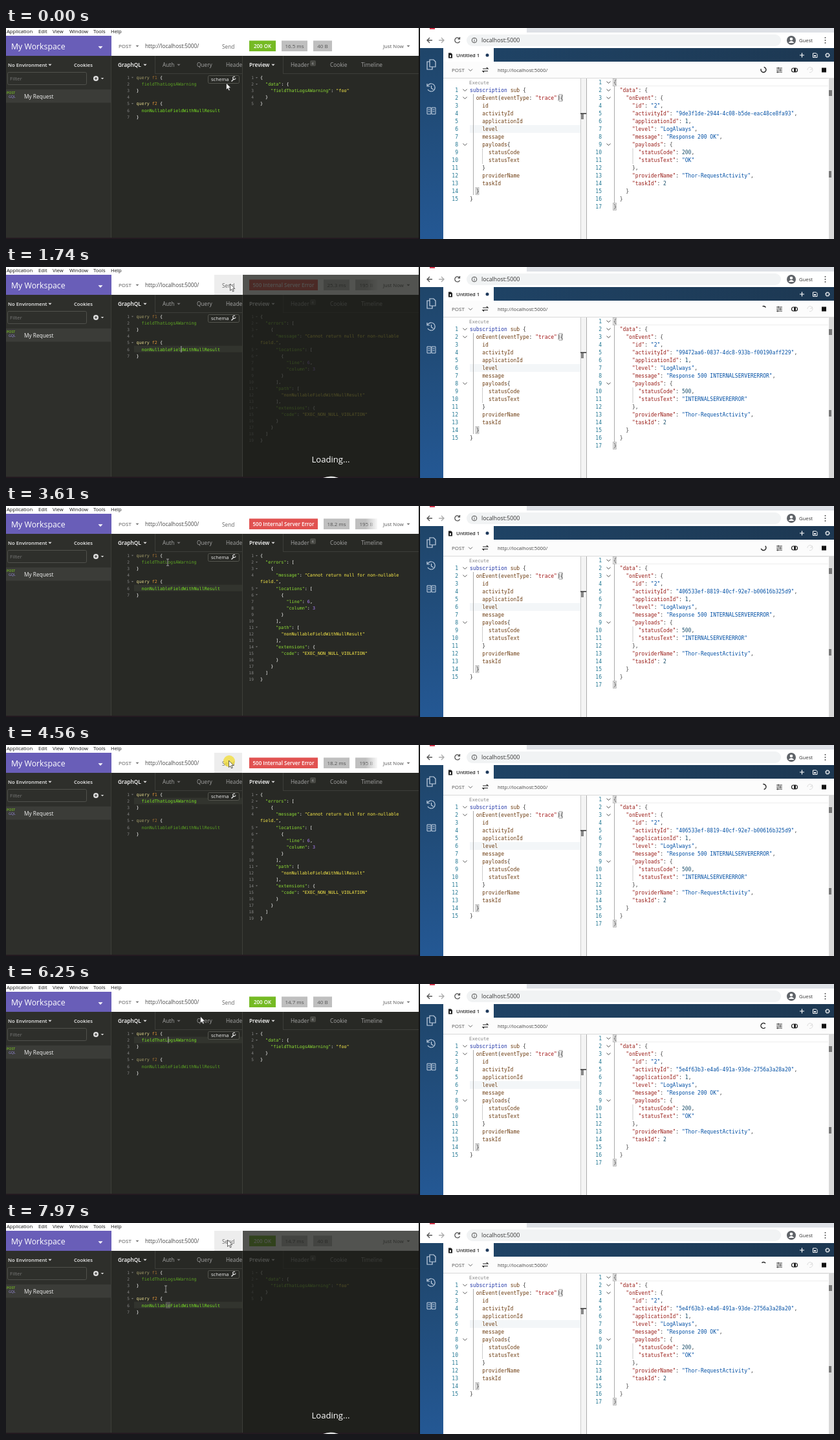
These frames come from a looping animation (1280x326 px, 8000 ms). An HTML page:

```html
<!DOCTYPE html>
<html>
<head>
<meta charset="utf-8">
<style>
html, body { margin: 0; width: 100%; height: 100%; overflow: hidden; background: #fff }
svg { display: block; width: 1280px; height: 326px }
text { white-space: pre; font-family: "Open Sans", "Noto Sans", sans-serif }
.m { font-family: "DejaVu Sans Mono", "Liberation Mono", monospace }
</style>
</head>
<body>
<svg viewBox="0 0 1280 326">
  <defs>
    <linearGradient id="bar"><stop stop-color="#1f4569"/><stop offset="1" stop-color="#1d3852"/></linearGradient>
    <linearGradient id="side" x2="0" y2="1"><stop stop-color="#1f4569"/><stop offset="1" stop-color="#245894"/></linearGradient>
    <linearGradient id="fade"><stop stop-color="#fff" stop-opacity="0"/><stop offset="1" stop-color="#fff"/></linearGradient>
  </defs>
  <g id="base"></g><g id="send"></g><g id="top"></g><g id="query"></g>
  <g id="preview"></g><g id="result"></g><g id="live"></g>
</svg>
<script>
const LOOP = 8000;
const $ = id => document.getElementById(id);
const rect = (x, y, w, h, fill, more = '') =>
  `<rect x="${x}" y="${y}" width="${w}" height="${h}" fill="${fill}" ${more}/>`;
const text = (x, y, s, size, fill, more = '') =>
  `<text x="${x}" y="${y}" font-size="${size}" fill="${fill}" ${more}>${s}</text>`;
const path = (d, stroke, w = 1, fill = 'none') =>
  `<path d="${d}" stroke="${stroke}" stroke-width="${w}" fill="${fill}"/>`;
const mono = (x, y, s, size, fill, more = '') => text(x, y, s, size, fill, 'class="m" ' + more);
const tri = (x, y, r, fill) => path(`M${x - r} ${y - r / 2}h${2 * r}l${-r} ${r * 1.1}z`, 'none', 0, fill);
const chevron = (x, y) => path(`M${x - 3} ${y - 1.5}l3 3 3-3`, '#555');
const bracket = (x, y) => rect(x, y, 5, 11, '#e4e4e4', 'stroke="#aaa" stroke-width=".7"');
const tint = (s, fill, more = '') => `<tspan fill="${fill}" ${more}>${s}</tspan>`;
const BOLD = 'font-weight="600"', END = 'text-anchor="end"';

// Colours JSON keys, strings and numbers
const json = (s, [key, str, num]) =>
  s.replace(/field\."|"[^"]*"?(?=(:?))|\b\d+\b|\bnull\b/g,
    (m, colon) => tint(m, colon ? key : /"/.test(m) ? str : num));

// ---------- static picture ----------
function drawBase() {
  let s = rect(0, 0, 640, 12, '#fff') + rect(0, 12, 163, 31, '#695eb8') + rect(163, 12, 475, 31, '#fff')
    + rect(0, 43, 163, 283, '#2e2f2b') + rect(163, 43, 476, 283, '#282925')
    + rect(0, 95, 162, 20.5, '#3b3c38')
    + path('M162.5 43V326M365.5 43V326M230.5 43V70M428.5 43V70M230 70.5H365M428 70.5H638', '#3d3e39')
    + rect(0, 324, 640, 2, '#231a20') + rect(638, 0, 2, 326, '#141414');
  s += rect(640, 0, 165, 7, '#fff') + rect(805, 0, 475, 7, '#dee1e6') + rect(655, 0, 8, 2, '#d33a50')
    + rect(640, 7, 640, 24, '#fff') + rect(712, 10, 486, 18, '#f1f3f4', 'rx="9"')
    + rect(640, 31, 640, 21, 'url(#bar)') + rect(640, 31, 36, 295, 'url(#side)')
    + rect(676, 31, 78, 21, '#fff') + rect(676, 52, 604, 274, '#fff')
    + rect(676, 52, 604, 25, '#fcfcfc') + path('M676 77.5H1280', '#d9d9d9')
    + rect(888, 78, 9, 248, '#f4f4f4') + path('M888.5 78V326', '#ccc') + path('M897.5 78V326', '#aaa')
    + rect(888, 131.5, 9, 1.5, '#333') + rect(889, 133, 4, 8, '#888')
    + rect(1272, 78, 8, 248, '#d9d9d9') + rect(1272, 96, 5, 9, '#777') + rect(1272, 221, 4, 10, '#777')
    + rect(717, 150, 171, 12, '#f3f6f8')
    + path('M937 78.5H1271M937 89.5H1271', '#eee');
  return s;
}

function drawTop() {
  let s = [['Application', 1], ['Edit', 50], ['View', 72], ['Window', 98], ['Tools', 135], ['Help', 162]]
    .map(([w, x]) => text(x, 8, w, 7.7, '#111')).join('');
  s += text(8, 33, 'My Workspace', 12.3, '#fff') + tri(146, 30, 3.5, '#fff')
    + text(174, 31, 'POST', 8, '#555') + tri(203, 28, 2.5, '#777')
    + text(215, 31, 'http://localhost:5000/', 8.3, '#444') + text(334, 31.5, 'Send', 8.3, '#666')
    + text(3, 59.5, 'No Environment', 7.7, '#eee', BOLD) + tri(68, 57, 2.6, '#ddd')
    + text(105, 59.5, 'Cookies', 7.7, '#eee', BOLD)
    + rect(2.5, 68.5, 122, 19, 'none', 'stroke="#50514c" rx="2"') + text(6, 81, 'Filter', 8, '#777')
    + '<circle cx="139" cy="78" r="4" fill="#ddd"/>' + path('M137 78h4M139 76v4', '#2e2f2b') + tri(149, 78, 2.2, '#ddd')
    + text(1, 102, 'POST', 5.3, '#75ba24', BOLD) + text(4, 108, 'GQL', 5.3, '#9a8fe0')
    + text(28, 108.5, 'My Request', 8.3, '#f4f4f4');
  s += text(173, 59.5, 'GraphQL', 8.3, '#fff', BOLD) + tri(215, 57, 2.6, '#ddd')
    + text(242, 59.5, 'Auth', 8.3, '#a5a5a5') + tri(267, 57, 2.6, '#777')
    + text(295, 59.5, 'Query', 8.3, '#a5a5a5') + text(340, 59.5, 'Heade', 8.3, '#a5a5a5')
    + text(376, 59.5, 'Preview', 8.3, '#fff', BOLD) + tri(413, 57, 2.6, '#ddd')
    + text(440, 59.5, 'Header', 8.3, '#a5a5a5') + rect(470, 50, 9, 9, '#484944', 'rx="2"')
    + text(472.5, 56.5, '4', 5.5, '#aaa')
    + text(501, 59.5, 'Cookie', 8.3, '#a5a5a5') + text(549, 59.5, 'Timeline', 8.3, '#a5a5a5');

  // browser bar
  s += path('M659 19h-8m4-4l-4 4 4 4', '#555', 1.3) + path('M669 19h8m-4-4l4 4-4 4', '#aaa', 1.3)
    + path('M701 16.5a4 4 0 1 0 .5 4M701.5 14v3h-3', '#555', 1.3)
    + '<circle cx="724" cy="19" r="3.8" fill="none" stroke="#555"/>' + path('M724 18.5v2.7M724 16.5v1', '#555')
    + text(735, 22, 'localhost:5000', 8.8, '#333')
    + '<circle cx="1214" cy="19" r="7" fill="#5f6368"/><circle cx="1214" cy="17" r="2.3" fill="#fff"/>'
    + path('M1209.5 23q4.5-6 9 0z', 'none', 0, '#fff') + text(1226, 22, 'Guest', 7.7, '#333')
    + [15, 19, 23].map(y => `<circle cx="1266.5" cy="${y}" r="1" fill="#555"/>`).join('');

  // tab bar, side icons and toolbar
  s += path('M684 38.5h4l2 2v6h-6z', 'none', 0, '#222') + rect(686, 42, 2, 3, '#fff')
    + text(696, 44.7, 'Untitled 1', 7.6, '#222', BOLD) + '<circle cx="744" cy="42" r="2.5" fill="#1f3a5c"/>'
    + path('M1227 42h7M1230.5 38.5v7', '#fff', 1.2) + path('M1247.5 39h5l1.5 1.5v5h-6.5z', '#fff', 1)
    + rect(1249, 42, 3, 2, '#fff') + '<circle cx="1270" cy="42" r="2.7" fill="none" stroke="#fff" stroke-width="1.8" stroke-dasharray="1.6 .5"/>'
    + path('M655 49h6l3 3v8h-9zM655 52h-4v12h8v-4M651 86v4h4M652 89a6 6 0 1 1 0 6M657.5 89v4l3 2', '#c6d3e3', 1.2)
    + path('M651 123h6v10h-6zM658 123h6v10h-6zM652.5 126h3M652.5 129h3M659.5 126h3M659.5 129h3', '#c6d3e3', 1)
    + text(689, 68, 'POST', 8, '#555') + path('M715 63.5l3 3 3-3', '#666')
    + path('M737 63h8l-2-2M745 66.5h-8l2 2', '#222', 1.2) + text(760, 67.7, 'http://localhost:5000/', 7.7, '#444')
    + path('M1191 62h9M1191 65h9M1191 68h9M1194 60.5v3M1197 63.5v3M1193 66.5v3', '#333', 1)
    + rect(1214.5, 62, 9, 6, 'none', 'rx="3" stroke="#222" stroke-width="1.2"') + rect(1218, 62, 3, 6, '#222')
    + path('M1239 65a4 4 0 1 1 3 3.5M1246 61v3h-3', '#ddd') + rect(1261, 61.5, 7, 7, '#111');

  // subscription editor
  const name = t => tint(t, '#6f3f14');
  const lines = [tint('subscription', '#2438a8') + ' ' + name('sub') + ' {',
    `  ${name('onEvent')}(${name('eventType')}: ${tint('"trace"', '#a31515')}){`,
    ...['id', 'activityId', 'applicationId', 'level', 'message'].map(w => '    ' + name(w)),
    '    ' + name('payloads') + '{', '      ' + name('statusCode'), '      ' + name('statusText'), '    }',
    '    ' + name('providerName'), '    ' + name('taskId'), '  }', '}'];
  s += mono(716, 87, 'Execute', 7.3, '#888')
    + path('M722.5 102V258', '#aaa') + path('M736.5 186V210', '#ccc')
    + bracket(855, 102.5) + bracket(726, 246.5)
    + lines.map((l, i) => mono(699, 99 + i * 12.03, i + 1, 8, '#237893', END)
      + mono(717, 99 + i * 12.03, l, 8, '#333')).join('')
    + [0, 1, 7].map(i => chevron(709.5, 96 + i * 12)).join('');
  return s;
}

// ---------- parts that follow the state ----------
function queryCode(active, band) {
  const row = i => 79.2 + i * 10.06;
  const block = (from, name, field) => {
    const dim = `fill-opacity="${active == name ? 1 : .65}"`;
    const code = [tint('query', '#e0d58a', dim) + ' ' + tint(name, '#dd9238', dim) + ' {',
      '  ' + tint(field, '#78e322', dim), '}'];
    return code.map((c, i) => mono(201.5, row(from + i), c, 6.73, '#fff')).join('');
  };
  let s = band ? rect(198, band == 2 ? 81.5 : 121.7, 167, 10, '#32342e') : '';
  for (let i = 0; i < 7; i++) s += mono(191, row(i), i + 1, 6.2, '#858585', END);
  return s + tri(195.5, 76.5, 1.6, '#777') + tri(195.5, 116.7, 1.6, '#777')
    + block(0, 'f1', 'fieldThatLogsAWarning') + block(4, 'f2', 'nonNullableFieldWithNullResult')
    + rect(312.5, 73.5, 48, 12, '#282925', 'rx="2" stroke="#55564f"')
    + text(317, 82, 'schema', 7.6, '#eee') + path('M348.5 82.5l4-4', '#ddd', 1.6) + path('M354 75.5a2.2 2.2 0 1 0 1 2', '#ddd', 1.2);
}

const GOOD = `{
  "data": {
    "fieldThatLogsAWarning": "foo"
  }
}`.split('\n');
const BAD = `{
  "errors": [
    {
      "message": "Cannot return null for non-nullable
field.",
      "locations": [
        {
          "line": 6,
          "column": 3
        }
      ],
      "path": [
        "nonNullableFieldWithNullResult"
      ],
      "extensions": {
        "code": "EXEC_NON_NULL_VIOLATION"
      }
    }
  ]
}`.split('\n');

function previewPane(ok, time) {
  const tag = (x, w, s, fill = '#bfbfbf', ink = '#555', more = '') => rect(x, 19.5, w, 16.5, fill)
    + text(x + w / 2, 31, s, 8, ink, 'text-anchor="middle" ' + more);
  let s = ok
    ? tag(376, 41, '200 OK', '#75ba24', '#fff', BOLD) + tag(426, 40, time) + tag(475, 29, '40 B')
    : tag(376, 106, '500 Internal Server Error', '#e15251', '#fff', BOLD) + tag(491, 40, time)
      + tag(540, 34, '195 B') + rect(556, 18, 20, 20, 'url(#fade)');
  s += text(583, 31, 'Just Now', 7.8, '#555') + tri(622, 28, 2.5, '#777');
  let n = 0;
  (ok ? GOOD : BAD).forEach((line, i) => {
    const y = 79.2 + i * 10.06;
    if (line[0] != 'f') s += mono(383, y, ++n, 6.2, '#858585', END);
    if (/[{[]$/.test(line)) s += tri(387.5, y - 2.5, 1.6, '#777');
    s += mono(393, y, json(line, ['#8fe035', '#fff04a', '#ae81ff']), 6.73, '#fff');
  });
  return s;
}

function resultPane(uuid, code, isRequest) {
  const status = code == 200 ? 'OK' : 'INTERNALSERVERERROR';
  const msg = isRequest ? 'Request POST http://localhost:5000/' : `Response ${code} ${status}`;
  const lines = `{
  "data": {
    "onEvent": {
      "id": "${isRequest ? 1 : 2}",
      "activityId": "${uuid}",
      "applicationId": 1,
      "level": "LogAlways",
      "message": "${msg}",
      "payloads": {
        "statusCode": ${isRequest ? 0 : code},
        "statusText": ${isRequest ? 'null' : `"${status}"`}
      },
      "providerName": "Thor-RequestActivity",
      "taskId": 2
    }
  }
}`.split('\n');
  let s = path('M940.5 90V270', '#aaa') + path('M969 186V210', '#ccc');
  if (!isRequest) s += bracket(938.5, 78.5) + bracket(938.5, 270.5);
  return s + lines.map((l, i) => mono(921, 87 + i * 12.03, i + 1, 8, '#237893', END)
    + mono(939, 87 + i * 12.03, json(l, ['#9a1f1a', '#0451a5', '#1b4f6b']), 8, '#444')).join('')
    + [0, 1, 2, 8].map(i => chevron(931.5, 84 + i * 12)).join('');
}

// ---------- timeline ----------
const ID = ['9de3f1de-2944-4c08-b5de-eac48ce8fa93', '99472aa6-0837-4dc8-933b-f00190aff229',
  '406533ef-8819-40cf-92e7-b00616b325d9', '084e7303-c7b8-4629-a35e-531dc77d6c08',
  '5e4f63b3-e4a6-491a-93de-2756a3a28a20'];
const RESULTS = [[0, ID[0], 200], [1120, ID[1], 500, 1], [1250, ID[1], 500], [2620, ID[2], 500, 1],
  [2900, ID[2], 500], [4900, ID[3], 200, 1], [5040, ID[3], 200], [5700, ID[4], 200, 1], [5860, ID[4], 200]];
const PREVIEWS = [[0, true, '16.5 ms'], [1250, false, '25.3 ms'], [2760, false, '18.2 ms'],
  [5060, true, '10.3 ms'], [5860, true, '14.7 ms']];
const QUERIES = [[0, 'f2', 0], [420, 'f2', 6], [3680, 'f1', 2], [7280, 'f2', 6]];
const LOADING = [[800, 1250], [1680, 2130], [2400, 2760], [4620, 5060], [5400, 5860], [7880, LOOP]];
const CLICKS = [420, 740, 1620, 2340, 3680, 4540, 5340, 7280, 7810];
const MOUSE = [[0, 341, 85], [110, 341, 85], [360, 270, 127], [440, 270, 127], [690, 347, 26], [2950, 347, 26],
  [3400, 252, 98], [3620, 250, 87], [3740, 250, 87], [4250, 345, 24], [6120, 345, 24], [6250, 301, 50],
  [6560, 248, 165], [6900, 247, 102], [7200, 250, 127], [7340, 250, 127], [7680, 343, 26], [8000, 343, 26]];
// time, start angle, sweep
const SPIN = [[0, -80, 280], [1740, 610, 80], [2820, 1140, 230], [4560, 1700, 180],
  [5160, 1870, 230], [6250, 2205, 270], [7970, 2750, 90], [8000, 2765, 95]];

const stepAt = (list, t) => list.filter(k => k[0] <= t).pop().slice(1);
function tween(list, t, ease = u => u) {
  const i = list.findIndex(k => k[0] > t), a = list[i - 1], b = list[i];
  const u = ease((t - a[0]) / (b[0] - a[0]));
  return a.slice(1).map((v, j) => v + (b[j + 1] - v) * u);
}

function spinner(t) {
  const [from, sweep] = tween(SPIN, t);
  const at = deg => { const r = deg * Math.PI / 180; return `${1171 + 4 * Math.cos(r)} ${64.5 + 4 * Math.sin(r)}`; };
  return path(`M${at(from)}A4 4 0 ${sweep > 180 ? 1 : 0} 1 ${at(from + sweep)}`, '#222', 1.4);
}
const ibeam = (x, y) => path(`M${x - 2} ${y - 5}h4M${x} ${y - 5}v10M${x - 2} ${y + 5}h4`, '#aaa', .9);
const arrow = (x, y) => path(`M${x} ${y}v10.5l2.4-2.2 1.7 3.7 1.7-.8-1.7-3.6h3.2z`, '#222', .7, '#fff');

function live(t, line) {
  let s = spinner(t);
  const [x, y] = tween(MOUSE, t, u => u * u * (3 - 2 * u));
  if (line && t % 1080 > 540) s += rect(t < 3680 ? 270.5 : 250.5, line == 2 ? 81.5 : 122, .8, 10, '#ccc');
  if (t >= 7280) s += rect(247, 122, 7, 10, '#888', 'opacity=".35"') + ibeam(247, 102);
  if (LOADING.some(([a, b]) => t >= a && t < b))
    s += rect(366, 12, 272, 312, '#1c1d19', 'opacity=".76"')
      + text(502, 302, 'Loading...', 13.1, '#fff', 'text-anchor="middle"')
      + '<path d="M490 326q12-5 24 0z" fill="#ddd"/>';
  if (CLICKS.some(c => t >= c && t < c + 110)) s += `<circle cx="${x}" cy="${y + 1}" r="9" fill="#f2dc30" opacity=".75"/>`;
  const overCode = y > 72 && x < 300;
  return s + (overCode ? ibeam(x, y) : arrow(x - .5, y));
}

const shown = {};
function put(id, draw, args) {
  const key = String(args);
  if (shown[id] !== key) { shown[id] = key; $(id).innerHTML = draw(...args); }
}

$('base').innerHTML = drawBase();
$('top').innerHTML = drawTop();
let start;
function frame(now) {
  start ??= now;
  const t = (now - start) % LOOP;
  const query = stepAt(QUERIES, t);
  const [mx, my] = tween(MOUSE, t);
  put('send', on => on ? rect(322, 12, 43, 31, '#ededed') : '', [mx > 322 && my < 43 ? 1 : 0]);
  put('query', queryCode, query);
  put('preview', previewPane, stepAt(PREVIEWS, t));
  put('result', resultPane, stepAt(RESULTS, t));
  $('live').innerHTML = live(t, query[1]);
  requestAnimationFrame(frame);
}
requestAnimationFrame(frame);
</script>
</body>
</html>
```
